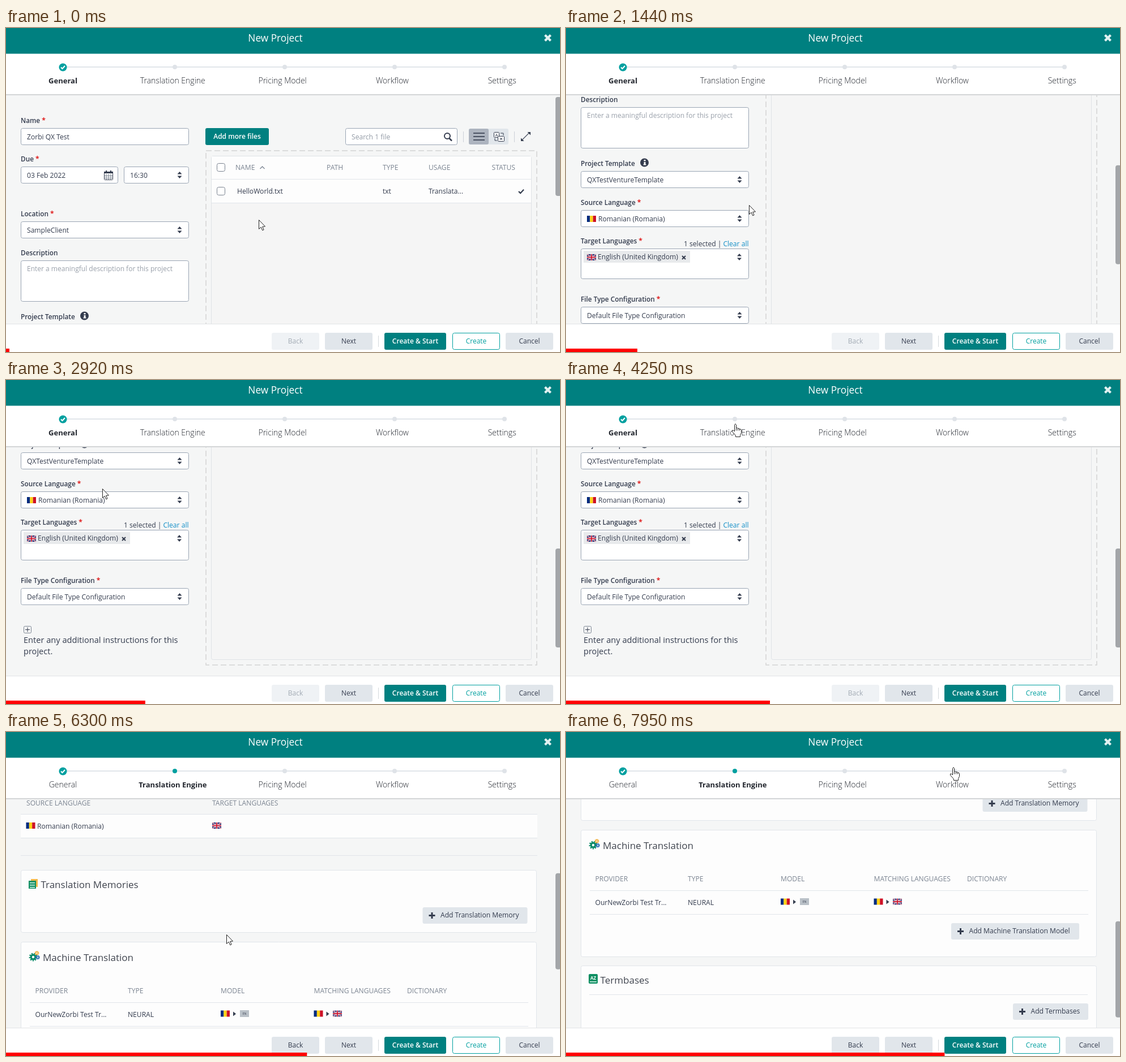
An HTML page with a canvas for the animation above (8 s loop, 978x573 px).

```html
<!DOCTYPE html>
<html lang="en">
<head>
<meta charset="utf-8">
<title>New Project wizard</title>
<style>
  html, body { margin: 0; width: 100%; height: 100%; overflow: hidden; background: #fff; }
  canvas { display: block; }
</style>
</head>
<body>
<canvas id="stage" width="978" height="573"></canvas>
<script>
const c = document.getElementById('stage').getContext('2d');
const LOOP = 8000, STEP = 68.4, PAGE_SWITCH = 4450;
const TEAL = '#008080', ACCENT = '#00a0a0', INK = '#343c4e', MUTED = '#7c8592',
      RULE = '#e1e5ea', BUTTON = '#e1e6eb', BORDER = '#9aa5b4', RED = '#e02020';

// Keys are [time, value, value...]
const CURSOR = [
  [0, 446, 339], [280, 440, 290], [480, 405, 215], [700, 345, 152], [890, 318, 190], [1160, 318, 290],
  [1436, 323, 313], [1700, 300, 310], [2100, 120, 285], [2320, 19, 260], [2530, 52, 243],
  [2873, 170, 192], [3340, 285, 141], [3650, 278, 112], [3950, 292, 77], [4500, 292, 77],
  [4850, 312, 160], [5335, 335, 230], [5800, 370, 320], [6293, 389, 358], [6566, 392, 363],
  [6800, 392, 363], [7150, 420, 260], [7540, 488, 104], [7934, 677, 62], [8000, 677, 62]];
const SCROLL = [
  [[900, 0], [1180, 125], [1436, 271], [1600, 315], [1760, 330], [2050, 395.5]],
  [[5520, 0], [5850, 125], [6100, 235], [6293, 297], [6400, 350], [6566, 493], [6680, 495]]];

function sample(keys, t) {
  if (t <= keys[0][0]) return keys[0].slice(1);
  for (let i = 1; i < keys.length; i++) {
    const [a, b] = [keys[i - 1], keys[i]];
    if (t <= b[0]) {
      const k = (t - a[0]) / (b[0] - a[0]);
      return a.slice(1).map((v, j) => v + (b[j + 1] - v) * k);
    }
  }
  return keys[keys.length - 1].slice(1);
}

function text(str, x, y, { size = 12.1, weight = 400, color = INK, align = 'left' } = {}) {
  c.font = `${weight} ${size}px "Open Sans", "Noto Sans", sans-serif`;
  c.fillStyle = color;
  c.textAlign = align;
  c.fillText(str, x, y);
}
function rect(x, y, w, h, color) {
  c.fillStyle = color;
  c.fillRect(x, y, w, h);
}
function box(x, y, w, h, fill, stroke, r = 3) {
  c.beginPath();
  c.roundRect(stroke ? x + .5 : x, stroke ? y + .5 : y, stroke ? w - 1 : w, stroke ? h - 1 : h, r);
  if (fill) { c.fillStyle = fill; c.fill(); }
  if (stroke) { c.strokeStyle = stroke; c.lineWidth = 1; c.stroke(); }
}
function disc(x, y, r, color) {
  c.beginPath();
  c.arc(x, y, r, 0, 7);
  c.fillStyle = color;
  c.fill();
}
function ring(x, y, r, color, width) {
  c.beginPath();
  c.arc(x, y, r, 0, Math.PI * 2);
  c.strokeStyle = color;
  c.lineWidth = width;
  c.stroke();
}
function trace(points, close) {
  c.beginPath();
  points.forEach(([x, y]) => c.lineTo(x, y));
  if (close) c.closePath();
}
function line(points, color, width = 1) {
  trace(points);
  c.strokeStyle = color;
  c.lineWidth = width;
  c.stroke();
}
function shape(points, fill, stroke) {
  trace(points, true);
  c.fillStyle = fill;
  c.fill();
  if (stroke) { c.strokeStyle = stroke; c.lineWidth = 1; c.stroke(); }
}
const rule = (x, y, w, h = 1) => rect(x, y, w, h, RULE);
const heading = (str, x, y) => text(str, x, y, { size: 17, color: '#40454f' });
const column = (str, x, y) => text(str, x, y, { color: MUTED });

function label(str, x, y, required) {
  text(str, x, y, { size: 11.8, weight: 600 });
  if (required) text('*', x + c.measureText(str).width + 3, y, { weight: 700, color: RED });
}
function button(str, x, y, w, { fill = BUTTON, color = INK, weight = 400, stroke } = {}) {
  box(x, y, w, 30, fill, stroke);
  text(str, x + w / 2, y + 19, { color, weight, size: 12, align: 'center' });
}
function addButton(str, x, y, w) {
  box(x, y, w, 29, BUTTON);
  rect(x + 11, y + 13, 11, 3, INK);
  rect(x + 15, y + 9, 3, 11, INK);
  text(str, x + 31.5, y + 18);
}
function sorter(x, y) {
  shape([[x - 4, y - 1.5], [x, y - 6], [x + 4, y - 1.5]], INK);
  shape([[x - 4, y + 1.5], [x, y + 6], [x + 4, y + 1.5]], INK);
}
function select(str, x, y, w, inset = 11, stroke = BORDER) {
  box(x, y, w, 30, '#fff', stroke);
  c.save();
  c.beginPath();
  c.rect(x, y, w - 42, 30);
  c.clip();
  text(str, x + inset, y + 20);
  c.restore();
  sorter(x + w - 16.5, y + 15);
}
function cross(x, y, r, color, width) {
  line([[x - r, y - r], [x + r, y + r]], color, width);
  line([[x - r, y + r], [x + r, y - r]], color, width);
}
function check(x, y, s, color, width) {
  line([[x - s, y], [x - s * .3, y + s * .7], [x + s, y - s * .7]], color, width);
}
function romania(x, y) {
  ['#002b7f', '#fcd116', '#ce1126'].forEach((color, i) => rect(x + i * 16 / 3, y, 16 / 3, 11, color));
}
function britain(x, y) {
  c.save();
  c.beginPath();
  c.rect(x, y, 16, 11);
  c.clip();
  rect(x, y, 16, 11, '#14246e');
  for (const [color, width] of [['#e4e6f0', 2], ['#c8142c', .7]]) {
    line([[x, y], [x + 16, y + 11]], color, width);
    line([[x, y + 11], [x + 16, y]], color, width);
  }
  for (const [color, half] of [['#f4f4f8', 1.6], ['#d0142c', .9]]) {
    rect(x, y + 5.5 - half, 16, half * 2, color);
    rect(x + 8 - half, y, half * 2, 11, color);
  }
  c.restore();
}
const arrowHead = (x, y) => shape([[x, y - 4], [x + 5, y], [x, y + 4]], INK);

function calendar(x, y) {
  box(x, y + 2, 16, 15, '#fff', INK, 1);
  rect(x, y + 2, 16, 3, INK);
  rect(x + 3, y, 2, 4, INK);
  rect(x + 11, y, 2, 4, INK);
  for (let i = 1; i < 4; i++) {
    rect(x + i * 4 - .5, y + 6, 1, 10, '#7d8592');
    if (i < 3) rect(x + 1, y + 5 + i * 4, 14, 1, '#7d8592');
  }
}

function generalForm() {
  label('Name', 26, 168, true);
  box(26, 177, 297, 30, '#fff', BORDER);
  text('Zorbi QX Test', 37, 197);
  label('Due', 26, 236, true);
  box(26, 245, 172, 30, '#fff', BORDER);
  text('03 Feb 2022', 37, 265);
  calendar(173, 252);
  select('16:30', 208, 245, 115);
  label('Location', 26, 333, true);
  select('SampleClient', 26, 342, 297);
  label('Description', 26, 402);
  box(26, 411, 297, 73, '#fff', BORDER);
  text('Enter a meaningful description for this project', 37, 430, { size: 12, color: '#9aa1ab' });
  label('Project Template', 26, 515);
  disc(138.5, 509, 7.5, INK);
  rect(137.5, 504, 3, 2.5, '#fff');
  rect(137.5, 508, 3, 5, '#fff');
  rect(136.5, 512, 5, 1.5, '#fff');
  select('QXTestVentureTemplate', 26, 524, 297);
  label('Source Language', 26, 584, true);
  select('Romanian (Romania)', 26, 593, 297, 31);
  romania(37, 603);
  label('Target Languages', 26, 652, true);
  text('1 selected |', 208, 657);
  text('Clear all', 322.5, 657, { color: '#1590c8', align: 'right' });
  box(26, 661, 297, 54, '#fff', BORDER);
  rect(31, 665, 188, 21, '#e8eaec');
  britain(37, 671);
  text('English (United Kingdom)', 56, 680);
  cross(208, 677, 3, INK, 2);
  sorter(306, 676);
  label('File Type Configuration', 26, 755, true);
  select('Default File Type Configuration', 26, 764, 297);
  box(31, 831, 14, 13, null, MUTED, 2);
  rect(34, 837, 8, 1, INK);
  rect(37.5, 833.5, 1, 8, INK);
  text('Enter any additional instructions for this', 31, 861, { size: 14.6 });
  text('project.', 31, 881, { size: 14.6 });
}

function filePanel(hover) {
  button('Add more files', 352, 177, 112, { fill: TEAL, color: '#fff', weight: 600 });
  box(599, 177, 198, 30, '#fff', BORDER);
  text('Search 1 file', 610, 197, { color: '#929aa5' });
  ring(779, 191, 5, INK, 2);
  line([[782.5, 195], [787, 199.5]], INK, 2.5);
  rect(807, 183, 1, 19, '#ccd1d8');
  rect(897, 183, 1, 19, '#ccd1d8');
  box(817, 178, 70, 28, BUTTON);
  box(817, 178, 35, 28, '#adb4bf');
  for (let i = 0; i < 3; i++) rect(825, 185 + i * 6, 20, 2, '#4a5262');
  box(861, 184, 10, 10, '#fff', INK, 1);
  box(868, 191, 12, 10, '#fff', INK, 1);
  text('A', 866, 192, { size: 8, align: 'center' });
  cross(874, 196, 2, INK, 1);
  line([[873, 186], [878, 186], [878, 190]], INK);
  line([[863, 195], [863, 199], [867, 199]], INK);
  line([[911, 198], [924, 185]], '#4a5262', 1.3);
  shape([[920.5, 184], [926, 184], [926, 189.5]], INK);
  shape([[909, 194.5], [909, 200], [914.5, 200]], INK);

  c.setLineDash([10, 5]);
  c.strokeStyle = '#d4d4d4';
  c.lineWidth = 1.5;
  c.strokeRect(353, 217, 584, 683);
  c.setLineDash([]);
  box(362, 226, 566, 665, '#f5f5f5', '#dfe2e6');
  rect(363, 227, 564, 82, '#fdfdfd');
  if (hover) rect(363, 268, 564, 41, '#eef2f5');
  rule(363, 267, 564);
  rule(363, 309, 564);
  box(372, 239, 15, 15, '#fff', '#78818e');
  box(372, 281, 15, 15, '#fff', '#78818e');
  [['NAME', 405], ['PATH', 566], ['TYPE', 665], ['USAGE', 746], ['STATUS', 857.5]]
    .forEach(([str, x]) => column(str, x, 251));
  line([[448.5, 249], [452.5, 245], [456.5, 249]], MUTED, 1.3);
  text('HelloWorld.txt', 408, 293);
  text('txt', 665, 293);
  text('Translata...', 746, 293);
  check(909.5, 289, 4.5, INK, 2.2);
}

function gear(x, y, r, color) {
  ring(x, y, r * .7, color, r * .6);
  c.setLineDash([r * .4, r * .385]);
  ring(x, y, r * 1.15, color, r * .4);
  c.setLineDash([]);
}

function enginePage(hover) {
  label('Translation Engine', 26, 168, true);
  select('ZorbiQX', 26, 177, 475, 11, ACCENT);
  const wave = [];
  for (let x = 37; x <= 92; x += 2) wave.push([x, 200 + (x % 4 === 1 ? 1 : -1)]);
  line(wave, '#f03030');
  rule(26, 227, 912, 2);
  label('Language Processing Rules', 26, 261, true);
  select('SampleClient - Default language processing rules', 26, 270, 316);
  rule(26, 324, 912);
  heading('Languages', 26, 368);
  rule(26, 402, 912);
  column('SOURCE LANGUAGE', 36, 427);
  column('TARGET LANGUAGES', 364, 427);
  rect(26, 443, 912, 41, '#fdfdfd');
  rule(26, 442, 912);
  rule(26, 484, 912);
  romania(35.5, 457);
  text('Romanian (Romania)', 55, 468);
  britain(364, 457);
  rule(26, 515, 912);

  box(26, 541, 911, 111, '#fdfdfd', RULE);
  rect(44, 557, 12, 14, '#f2b84b');
  rect(40, 560, 13, 14, '#0d8f62');
  for (let i = 0; i < 3; i++) rect(42, 563 + i * 4, 9, 1.5, '#d9f2e8');
  heading('Translation Memories', 61.5, 573);
  addButton('Add Translation Memory', 735.5, 607, 185);

  box(26, 668, 911, 225, '#fdfdfd', RULE);
  gear(48, 695, 5.5, '#0b8a68');
  gear(54.5, 688, 3, '#f0ae3c');
  gear(56, 695.5, 3, '#2f6fb5');
  heading('Machine Translation', 65, 702);
  [['PROVIDER', 51.5], ['TYPE', 215], ['MODEL', 379], ['MATCHING LANGUAGES', 543.5], ['DICTIONARY', 708]]
    .forEach(([str, x]) => column(str, x, 759));
  if (hover) rect(42, 776, 880, 41, '#f1f4f6');
  rule(42, 775, 880);
  rule(42, 817, 880);
  text('OurNewZorbi Test Tr...', 51.5, 801);
  text('NEURAL', 215, 801);
  romania(379, 789.5);
  arrowHead(401, 795.5);
  rect(413, 789, 16, 12, '#b9c0c7');
  text('EN', 421, 797, { size: 5, align: 'center' });
  romania(543.5, 789.5);
  arrowHead(565.5, 795.5);
  britain(577, 789.5);
  addButton('Add Machine Translation Model', 680, 833, 226);

  box(26, 908, 911, 130, '#fdfdfd', RULE);
  box(40, 923, 16, 17, '#0d8f62', null, 2);
  rect(42, 936, 12, 1.5, '#d9f2e8');
  text('AZ', 48, 933, { size: 8, weight: 700, color: '#fff', align: 'center' });
  heading('Termbases', 60.5, 940);
  rule(41, 959, 880);
  addButton('Add Termbases', 789, 975, 133);
}

function chrome(page) {
  rect(0, 45, 978, 73, '#fff');
  rect(0, 0, 978, 45.5, TEAL);
  text('New Project', 475.5, 24, { size: 17.3, color: '#fff', align: 'center' });
  cross(956.5, 17.5, 5, '#e2f1f1', 4);
  rect(0, 117, 978, 2, '#d3d5d7');
  rule(100, 68, 780, 2);
  ['General', 'Translation Engine', 'Pricing Model', 'Workflow', 'Settings'].forEach((name, i) => {
    const current = i === page;
    if (i) disc(298 + (i - 1) * 194, 69, 4, current ? ACCENT : '#dfe3e8');
    text(name, 100.5 + i * 193.8, 98, {
      size: current ? 13 : 14, weight: current ? 700 : 300, color: '#22262e', align: 'center' });
  });
  disc(100.5, 69.5, 7, ACCENT);
  check(100.5, 69.5, 3.5, '#fff', 2);

  rect(0, 523, 978, 50, '#fff');
  rect(0, 523, 978, 1, '#e2e4e6');
  button('Back', 469, 539, 84, page ? {} : { fill: '#eff2f5', color: '#a3abb5' });
  button('Next', 563, 539, 84);
  rect(657, 544, 1, 20, '#d5d9de');
  button('Create & Start', 668, 539, 109, { fill: TEAL, color: '#fff', weight: 600 });
  button('Create', 788, 539, 84, { fill: '#fff', color: ACCENT, stroke: ACCENT });
  button('Cancel', 882, 539, 84);
}

function pointer(x, y) {
  c.save();
  c.translate(x + .5, y + .5);
  c.lineJoin = 'round';
  if (y > 112) {
    shape([[0, 0], [0, 16], [3.7, 12.6], [6.2, 18.3], [8.6, 17.3], [6.2, 11.8], [11, 11.5]], '#fff', '#222');
  } else {
    shape([[5, 2], [6.5, 0], [8, 2], [8, 8], [10, 7], [11.3, 8.5], [13, 8], [14.3, 9.7], [16, 9.5],
      [17, 11], [17, 16], [15, 20], [15, 23], [7, 23], [6.5, 20], [1, 14], [1, 11.5], [3, 11.5], [5, 13.5]],
      '#fff', '#222');
    for (const px of [8, 11, 14]) line([[px, 8.5], [px, 12]], '#222');
  }
  c.restore();
}

function draw(now) {
  const step = Math.floor(now % LOOP / STEP + .1);
  const t = step * STEP;
  const page = t < PAGE_SWITCH ? 0 : 1;
  const [x, y] = sample(CURSOR, t);
  const [scroll] = sample(SCROLL[page], t);
  const rowTop = page ? 776 : 268, contentY = y + scroll;
  const hover = contentY > rowTop && contentY < rowTop + 41 && x > (page ? 42 : 363);

  rect(0, 0, 978, 573, '#f5f6f6');
  c.save();
  c.beginPath();
  c.rect(0, 119, 978, 404);
  c.clip();
  c.translate(0, -Math.round(scroll));
  if (page) enginePage(hover);
  else { generalForm(); filePanel(hover); }
  c.restore();
  box(970, 122 + scroll * (page ? .43 : .445), 10, page ? 170 : 175, '#a3a6a9', null, 4);
  chrome(page);
  rect(0, 567, 6 + step * 5.71, 6, '#f00');
  pointer(x, y);
  requestAnimationFrame(draw);
}
requestAnimationFrame(draw);
</script>
</body>
</html>
```
